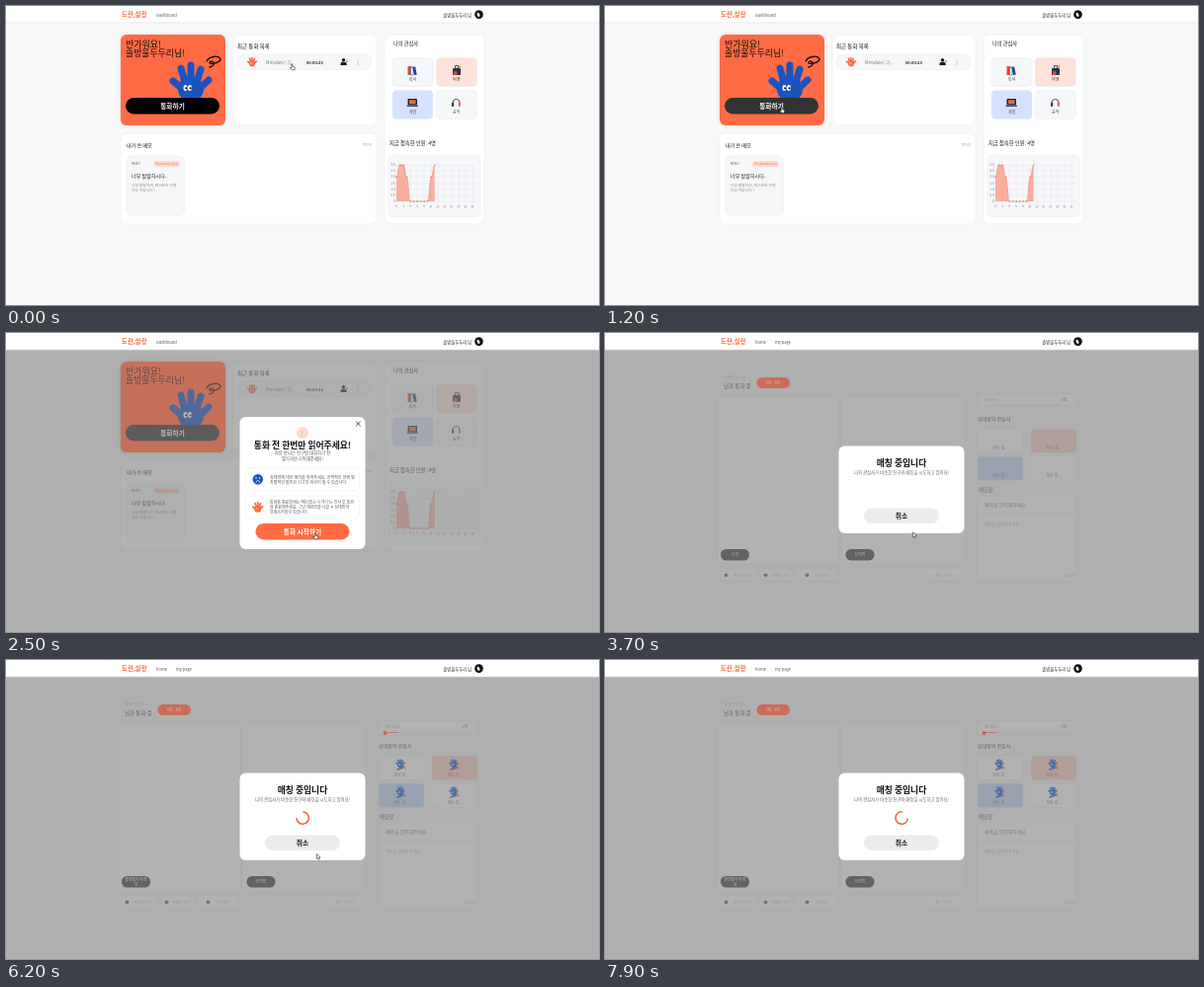
Recreate the animation shown at these times as an HTML page with a canvas. Size 600 px wide and 303 px high, loop 8 s.

```html
<!DOCTYPE html>
<html lang="ko">
<head>
<meta charset="utf-8">
<title>통화 매칭</title>
<style>
html, body { margin: 0; width: 100%; height: 100%; overflow: hidden; background: #f8f8f9; }
canvas { display: block; width: 600px; height: 303px; }
</style>
</head>
<body>
<canvas id="stage"></canvas>
<script>
const canvas = document.getElementById('stage');
const dpr = window.devicePixelRatio || 1;
canvas.width = 600 * dpr;
canvas.height = 303 * dpr;
const g = canvas.getContext('2d');

const LOOP = 8000, STEP = 100;
const FONT = '"Noto Sans CJK KR", "Noto Sans CJK JP", "Noto Sans CJK", "Noto Sans", sans-serif';
const ORANGE = '#ff6b45', BLUE = '#1c53c0', PANEL = '#f5f7f9', EDGE = '#e9ecf0', INK = '#161616';
const USER = '솔방울두두리', BRAND = '도란,살랑';

function text(s, x, y, size, color = INK, weight = 400, align = 'left') {
  g.font = `${weight} ${size}px ${FONT}`;
  g.fillStyle = color;
  g.textAlign = align;
  g.textBaseline = 'middle';
  g.fillText(s, x, y);
}

function box(x0, y0, x1, y1, r, fill, stroke) {
  g.beginPath();
  g.roundRect(x0, y0, x1 - x0, y1 - y0, r);
  if (fill) { g.fillStyle = fill; g.fill(); }
  if (stroke) { g.strokeStyle = stroke; g.lineWidth = 0.6; g.stroke(); }
}

function dot(x, y, r, fill) {
  g.beginPath();
  g.arc(x, y, r, 0, 7);
  g.fillStyle = fill;
  g.fill();
}

function line(color, width, ...p) {
  g.beginPath();
  g.moveTo(p[0], p[1]);
  for (let i = 2; i < p.length; i += 2) g.lineTo(p[i], p[i + 1]);
  g.strokeStyle = color;
  g.lineWidth = width;
  g.lineCap = g.lineJoin = 'round';
  g.stroke();
}

function at(x, y, scale, draw) {
  g.save();
  g.translate(x, y);
  g.scale(scale, scale);
  draw();
  g.restore();
}

// Open hand with two eyes, about 42 units wide
function hand(x, y, scale, color, eye = '#fff', pupil = INK) {
  at(x, y, scale, () => {
    const tips = [[-18, -7], [-10, -20], [0, -23], [10, -19], [18, -8]];
    for (const [tx, ty] of tips) line(color, 7, tx * 0.35, 3, tx, ty);
    g.beginPath();
    g.ellipse(0, 1, 13, 13, 0, 0, 7);
    g.fillStyle = color;
    g.fill();
    for (const ex of [-5.5, -1]) {
      g.beginPath();
      g.ellipse(ex, 0, 2, 3, 0, 0, 7);
      g.fillStyle = eye;
      g.fill();
      dot(ex + 0.7, 0.3, 1.1, pupil);
    }
  });
}

function orangeHand(x, y, scale) {
  hand(x, y, scale, ORANGE);
}

function header(links) {
  box(0, 0, 600, 17, 0, '#fff');
  g.fillStyle = '#e6e6e8';
  g.fillRect(0, 16.6, 600, 0.7);
  text(BRAND, 117, 8.8, 6.4, ORANGE, 900);
  for (const [s, x] of links) text(s, x, 9, 4.1, '#555');
  text(USER + ' 님', 471, 9, 4.3, '#222', 400, 'right');
  dot(478.5, 8.6, 4.3, '#0c0c0c');
  g.beginPath();
  g.ellipse(478, 8.8, 1.4, 2.2, -0.4, 0, 7);
  g.fillStyle = '#f4f4f4';
  g.fill();
}

function heroCard(dim, hover) {
  g.save();
  g.shadowColor = 'rgba(0,0,0,.12)';
  g.shadowBlur = 4 * dpr;
  box(116, 29, 222, 121, 6, dim ? '#c67059' : ORANGE);
  g.restore();
  const ink = dim ? '#5b4c48' : '#140d0a';
  text('반가워요!', 121, 39, 9, ink, 500);
  text(USER + '님!', 121, 47.3, 8.9, ink, 500);
  g.beginPath();
  g.moveTo(203, 56);
  g.bezierCurveTo(206, 50, 217, 50, 217, 54);
  g.bezierCurveTo(216, 58, 205, 60, 206, 57);
  g.bezierCurveTo(209, 54, 214, 60, 206, 62);
  g.strokeStyle = ink;
  g.lineWidth = 1.3;
  g.stroke();
  hand(187, 83, 1, dim ? '#506998' : BLUE, dim ? '#bbb' : '#fff', ink);
  const fill = dim ? (hover ? '#707070' : '#5c5c5c') : (hover ? '#333' : '#000');
  box(121, 93, 216, 109.5, 8.2, fill);
  text('통화하기', 168.5, 101.2, 6.7, dim ? '#bdbdbd' : '#fff', 700, 'center');
}

function callCard() {
  box(230, 29, 375, 121, 6, '#fff', EDGE);
  text('최근 통화 목록', 234, 41.2, 5.5, INK, 500);
  box(234, 49, 370, 64.5, 7, PANEL, EDGE);
  orangeHand(249, 58, 0.24);
  text('Mirodalvi | 기...', 263, 57, 4.3, '#777');
  text('00:00:23', 304, 57, 4, INK, 700);
  dot(341.5, 54.8, 1.7, INK);
  box(338.5, 56.8, 344.7, 60, [2, 2, 0, 0], INK);
  dot(345, 56, 0.9, ORANGE);
  for (const y of [55, 57, 59]) dot(356, y, 0.5, '#888');
}

function memoCard() {
  box(116, 129, 375, 221, 6, '#fff', EDGE);
  text('내가 쓴 메모', 122, 141.3, 5.1, INK, 500);
  text('more', 370, 140.5, 3.8, '#aaa', 400, 'right');
  box(122, 152, 180.5, 212, 5, PANEL, EDGE);
  text('MEMO', 127, 160, 2.9, '#555');
  box(149, 157, 175.5, 163, 2.5, '#ffdcd3');
  text('Mirodalvi와의 통화', 162.2, 160, 2.8, ORANGE, 500, 'center');
  text('너무 발랄하시다..', 127, 172.3, 5.1, '#222', 500);
  text('너무 발랄하셔, 테스트도 수행', 127, 181.3, 3.8, '#888');
  text('가능 하답니다 !', 127, 186.3, 3.8, '#888');
}

function interestIcons() {
  box(406.5, 61, 409.5, 70, 0.5, '#e5472d');
  box(409.5, 62, 412, 70, 0.5, '#fff', '#1d3c7c');
  at(413.5, 66, 1, () => { g.rotate(-0.2); box(-1.3, -4.5, 1.5, 4, 0.5, '#24468f'); });

  box(452, 63, 460, 70, 1, '#26304a');
  line('#26304a', 0.8, 454.5, 63, 454.5, 60.5, 457.5, 60.5, 457.5, 63);
  box(453, 66, 456.5, 70, 0.8, '#d8472d');
  dot(459, 61.5, 1.2, '#e8a13f');

  box(406.5, 94, 416, 100.5, 0.8, '#1d2336');
  box(408, 95.3, 414.5, 99.2, 0.3, '#ef6a4c');
  box(405.5, 100.5, 417, 102, 0.6, '#454b60');

  g.beginPath();
  g.arc(455.5, 98, 3.6, Math.PI, 0);
  g.strokeStyle = '#333b4d';
  g.lineWidth = 0.9;
  g.stroke();
  box(451, 97.5, 453.2, 102, 1, '#333b4d');
  box(457.8, 97.5, 460, 102, 1, '#e0705a');
}

function chart() {
  box(387, 151, 480, 214, 5, PANEL, EDGE);
  const px = i => 395 + i * 3.52, py = v => 198 - v * 12.3;
  for (let i = 0; i <= 6; i++) {
    const y = py(i / 2);
    line('#e0e3e7', 0.4, 395, y, 476, y);
    text(i ? (i / 2).toFixed(1) : '0', 393.5, y, 2.9, '#666', 400, 'right');
  }
  for (let i = 0; i < 24; i += 2) {
    line('#e0e3e7', 0.4, px(i), 161, px(i), 199);
    at(px(i) + 0.5, 202, 1, () => {
      g.rotate(-0.8);
      text(String(i), 0, 0, 2.9, '#666', 400, 'right');
    });
  }
  const values = [2, 3, 3, 2, 0, 0, 0, 0, 0, 0, 2, 3];
  const trace = () => values.forEach((v, i) => {
    if (!i) return g.lineTo(px(0), py(v));
    const mid = (px(i) + px(i - 1)) / 2;
    g.bezierCurveTo(mid, py(values[i - 1]), mid, py(v), px(i), py(v));
  });
  g.beginPath();
  g.moveTo(px(0), py(0));
  trace();
  g.lineTo(px(11), py(0));
  g.fillStyle = 'rgba(255,125,95,.58)';
  g.fill();
  g.beginPath();
  trace();
  g.strokeStyle = '#e98b76';
  g.lineWidth = 0.6;
  g.stroke();
  values.forEach((v, i) => dot(px(i), py(v), 0.65, '#d9664c'));
}

function sideCard() {
  box(383, 29, 484, 221, 6, '#fff', EDGE);
  text('나의 관심사', 392, 38.3, 5.2, INK, 500);
  const tiles = [['독서', PANEL], ['여행', '#ffe2d9'], ['개발', '#d5e2ff'], ['음악', PANEL]];
  tiles.forEach(([label, fill], i) => {
    const x = 391 + (i % 2) * 44.3, y = 52.5 + (i >> 1) * 33;
    box(x, y, x + 41, y + 29, 4, fill, EDGE);
    text(label, x + 20.5, y + 22, 4, '#444', 400, 'center');
  });
  interestIcons();
  text('지금 접속한 인원: 4명', 388, 139.3, 5.3, INK, 500);
  chart();
}

function shade() {
  g.fillStyle = 'rgba(132,132,132,.62)';
  g.fillRect(0, 0, 600, 303);
}

function dashboard(dim, hover) {
  callCard();
  memoCard();
  sideCard();
  if (dim) shade();
  heroCard(dim, hover);
  header([['Dashboard', 152]]);
}

function guideModal() {
  box(236.5, 85, 363.5, 219, 6, '#fff');
  line('#333', 0.9, 354.4, 90, 358.4, 94);
  line('#333', 0.9, 358.4, 90, 354.4, 94);
  dot(300, 101, 6, '#ffd9ce');
  text('!', 300, 101, 7, '#ff9c80', 500, 'center');
  text('통화 전 한번만 읽어주세요!', 300, 113.5, 8.8, '#111', 700, 'center');
  text('처음 만나는 친구랑 대화하기 전', 300, 121.3, 4.4, '#555', 400, 'center');
  text('몇가지만 기억해주세요!', 300, 127, 4.3, '#555', 400, 'center');

  box(242.5, 137, 357.5, 159.5, 4, '#fff', '#ececef');
  dot(254.8, 148.2, 5.2, BLUE);
  dot(253, 147, 0.8, '#fff');
  dot(256.6, 147, 0.8, '#fff');
  g.beginPath();
  g.arc(254.8, 151.3, 1.8, Math.PI, 0);
  g.strokeStyle = '#fff';
  g.lineWidth = 0.7;
  g.stroke();
  text('상대방에 대한 예의를 지켜주세요. 공격적인 언행 및', 267, 146, 4.1, '#555');
  text('차별적인 발언은 신고의 대상이 될 수 있습니다.', 267, 151, 4.1, '#555');

  box(242.5, 165, 357.5, 188, 4, '#fff', '#ececef');
  orangeHand(254.8, 178, 0.27);
  ["통화를 종료할때는 '매너있는 나가기'는 인사 후 통화", '를 종료해주세요. 그냥 대화방을 나갈 시 상대방이', '당황스러울수 있습니다.']
    .forEach((s, i) => text(s, 267, 171.3 + i * 5, 4, '#555'));

  box(252.5, 193, 347.5, 209.5, 8.2, ORANGE);
  text('통화 시작하기', 300, 201.2, 6.7, '#fff', 700, 'center');
}

function callPage(loaded) {
  const faint = '#b8b8b8', mid = '#777';
  text('방 제목입니다', 120, 44.5, 3.9, faint);
  text('님과 통화 중', 120, 53.5, 5.5, '#333', 500);
  box(114, 65, 237, 234, 4, '#fff', EDGE);
  box(239, 65, 364, 234, 4, '#fff', EDGE);
  const tools = [[117, 153, '마이크 끄기'], [157, 190, '카메라 끄기'], [194, 236, '신고하기'], [325, 361, '매너 나가기']];
  tools.forEach(([a, b, s], i) => {
    box(a, 239, b, 251.5, 4, '#fff', EDGE);
    text(s, (a + b) / 2 + (i < 3 ? 4 : 0), 245.5, 3.8, faint, 400, 'center');
    if (i < 3) dot(a + (i === 2 ? 10.5 : 5.5), 245.3, 1.9, '#555');
  });

  box(377, 62, 476, 76, 3, '#fff', EDGE);
  text('매너온도', 384, 67.3, 3.8, loaded ? '#d98572' : faint);
  text('3점', 467, 67.5, 4, mid, 500, 'right');
  line('#e2e2e2', 0.8, 384, 73.5, 468, 73.5);
  text('상대방의 관심사', 377, 87.2, 5, '#333', 500);
  const fills = ['#fff', '#ffcabb', '#bcd4f8', '#fff'];
  fills.forEach((fill, i) => {
    const x = 377 + (i % 2) * 54, y = 97 + (i >> 1) * 28;
    box(x, y, x + 46, y + 24.5, 3, fill, EDGE);
    text('정보 없..', x + 22.5, y + 19, 4, mid, 400, 'center');
  });
  text('메모장', 378, 159.5, 5.2, '#333', 500);
  box(377, 165, 476, 252, 3, '#fff', EDGE);
  text('제목을 입력해주세요.', 384, 174, 4.9, mid);
  line('#e4e4e4', 0.6, 380, 183, 473, 183);
  text('메모를 입력해 주세요', 384, 194, 4, faint);
  text('0/1000', 475, 246, 3.6, faint, 400, 'right');
  shade();

  box(153.5, 45, 187, 56, 5.5, '#c96d58');
  text('00 : 00', 170, 50.5, 4.8, '#e0b1a6', 500, 'center');
  box(117, 219, 146, 230.5, 5.5, '#626262');
  box(243.5, 219, 272.5, 230.5, 5.5, '#626262');
  text('상대방', 258, 224.8, 4, '#b5b5b5', 400, 'center');
  if (loaded) {
    text(USER, 131.5, 222.5, 4, '#c4c4c4', 400, 'center');
    text('님', 131.5, 227.3, 4, '#c4c4c4', 400, 'center');
    dot(383.5, 74, 1.9, '#c65f4a');
    line('#c65f4a', 0.7, 384, 73.5, 396, 73.5);
    for (let i = 0; i < 4; i++) {
      const x = 399 + (i % 2) * 54, y = 106 + (i >> 1) * 28;
      hand(x, y, 0.22, '#4c6ba6', '#ddd', '#444');
      line('#4c6ba6', 1.6, x - 3, y + 5, x + 3, y + 3);
      line('#c07461', 1.3, x + 3, y, x + 5, y + 4);
    }
  } else {
    text('나의', 131.5, 224.8, 4, '#b5b5b5', 400, 'center');
  }
  header([['home', 152], ['my page', 172]]);
}

function matchModal(t, loaded) {
  box(236.5, 114.5, 363.5, 203, 6, '#fff');
  text('매칭 중입니다', 300, 131.7, 8.8, '#111', 700, 'center');
  text('나의 관심사가 비슷한 친구와 매칭을 시도하고 있어요!', 300, 141, 4.4, '#666', 400, 'center');
  if (loaded) {
    const gap = Math.PI * 1.25 + (t - 6200) / 750 * Math.PI * 2;
    g.beginPath();
    g.arc(300.2, 160, 6.2, gap + Math.PI / 4, gap - Math.PI / 4 + Math.PI * 2);
    g.strokeStyle = '#f2694a';
    g.lineWidth = 1.6;
    g.lineCap = 'butt';
    g.stroke();
  }
  box(262, 177.5, 338, 193, 7.7, '#ececec');
  text('취소', 300, 185.3, 6.7, '#111', 700, 'center');
}

// Pointer stops: time, x, y
const PATH = [
  [0, 288, 59], [100, 288, 59], [900, 177.5, 102.5], [1500, 177.5, 102.5],
  [2400, 311, 203], [2500, 311.5, 203], [3700, 311.5, 202], [4500, 311.5, 202],
  [5400, 314.5, 196.5], [7200, 314.5, 196.5], [7800, 604, 221], [8000, 604, 221]
];

function pointer(t) {
  const i = PATH.findIndex(p => p[0] > t);
  const [t0, x0, y0] = PATH[i - 1], [t1, x1, y1] = PATH[i];
  const k = (t - t0) / (t1 - t0), e = k * k * (3 - 2 * k);
  return [x0 + (x1 - x0) * e, y0 + (y1 - y0) * e];
}

function drawPointer(x, y, isHand) {
  at(x, y, 1, () => {
    g.beginPath();
    const shape = isHand
      ? [0.6, 0, 1.6, 0, 1.8, 2.2, 4.2, 3, 4, 5.8, 1.2, 5.8, -0.8, 3.4, 0.6, 3.6]
      : [0, 0, 0, 5, 1.2, 4, 2, 5.8, 2.9, 5.4, 2.1, 3.7, 3.6, 3.6];
    for (let i = 0; i < shape.length; i += 2) g.lineTo(shape[i], shape[i + 1]);
    g.closePath();
    g.fillStyle = '#fff';
    g.fill();
    g.strokeStyle = '#333';
    g.lineWidth = 0.6;
    g.stroke();
  });
}

function render(t) {
  g.setTransform(dpr, 0, 0, dpr, 0, 0);
  box(0, 0, 600, 303, 0, '#f8f8f9');
  const [x, y] = pointer(t);
  const onStart = x > 121 && x < 216 && y > 92 && y < 110;
  if (t < 3700) {
    const dim = t >= 1300;
    dashboard(dim, onStart);
    if (dim) guideModal();
  } else {
    const loaded = t >= 3800;
    callPage(loaded);
    matchModal(t, loaded);
  }
  const onRow = t < 1300 && y > 49 && y < 64 && x > 234;
  const onConfirm = t >= 1300 && t < 3700 && x > 252 && x < 348 && y > 193;
  drawPointer(x, y, onStart || onRow || onConfirm);
}

const start = performance.now();
function tick() {
  const t = (performance.now() - start) % LOOP;
  render(Math.floor(t / STEP) * STEP);
  requestAnimationFrame(tick);
}
tick();
</script>
</body>
</html>
```
